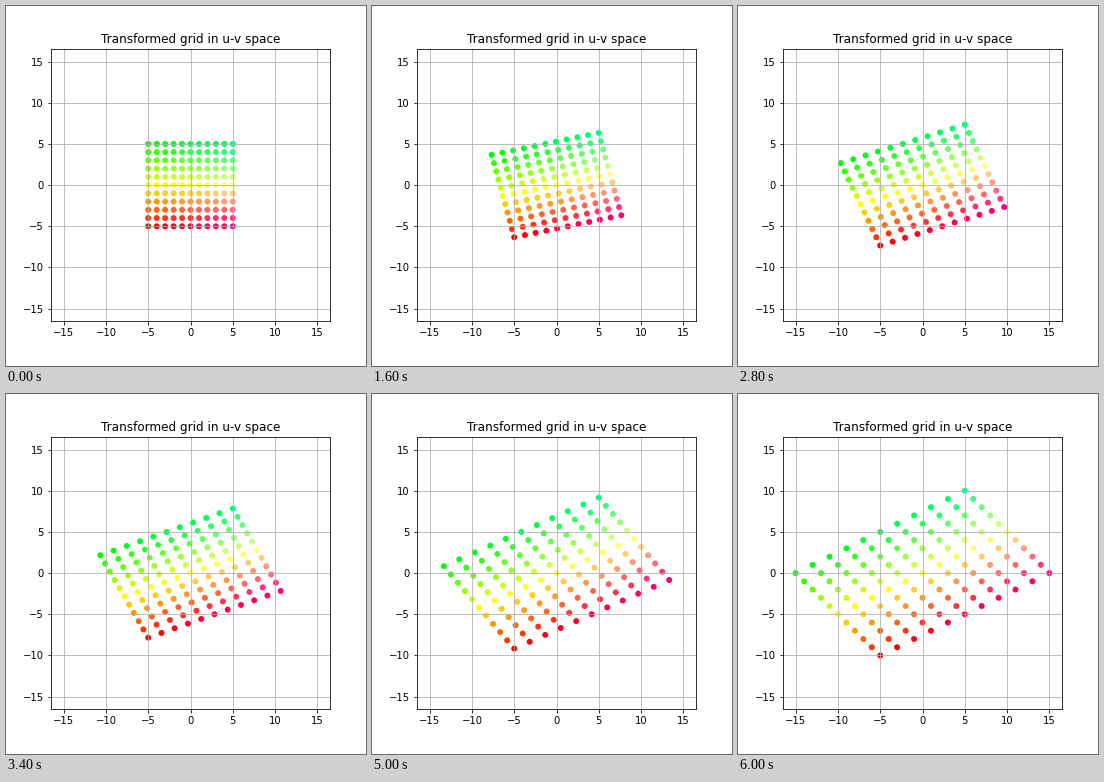
Write a matplotlib script that moves like this. It is 360 by 360 pixels and loops after 6200 ms.

```python
import numpy as np
import matplotlib.pyplot as plt
from matplotlib.animation import FuncAnimation

STEPS = 30
LIMIT = 16.5


def grid_color(x, y):
    return min(1, 1 - y / 5), min(1, 1 + y / 5), 0.25 + x / 20


ticks = np.linspace(-5, 5, 11)
points = np.array([(x, y) for x in ticks for y in ticks])
colors = [grid_color(x, y) for x, y in points]

identity = np.eye(2)
target = np.array([[2, -1], [1, 1]])

fig = plt.figure(figsize=(5, 5), dpi=72, facecolor="w")
fig.subplots_adjust(left=0.125, right=0.9, bottom=0.125, top=0.88)
ax = fig.add_subplot()
ax.set_xlim(-LIMIT, LIMIT)
ax.set_ylim(-LIMIT, LIMIT)
ax.set_xticks(range(-15, 16, 5))
ax.set_yticks(range(-15, 16, 5))
ax.grid(True)
ax.set_title("Transformed grid in u-v space")
dots = ax.scatter(points[:, 0], points[:, 1], s=36, c=colors, edgecolor="none")


def update(i):
    # blend linearly from the identity to the final matrix
    matrix = identity + (target - identity) * i / STEPS
    dots.set_offsets(points @ matrix.T)
    return (dots,)


anim = FuncAnimation(fig, update, frames=STEPS + 1, interval=200,
                     repeat=True, repeat_delay=0)
plt.show()
```
